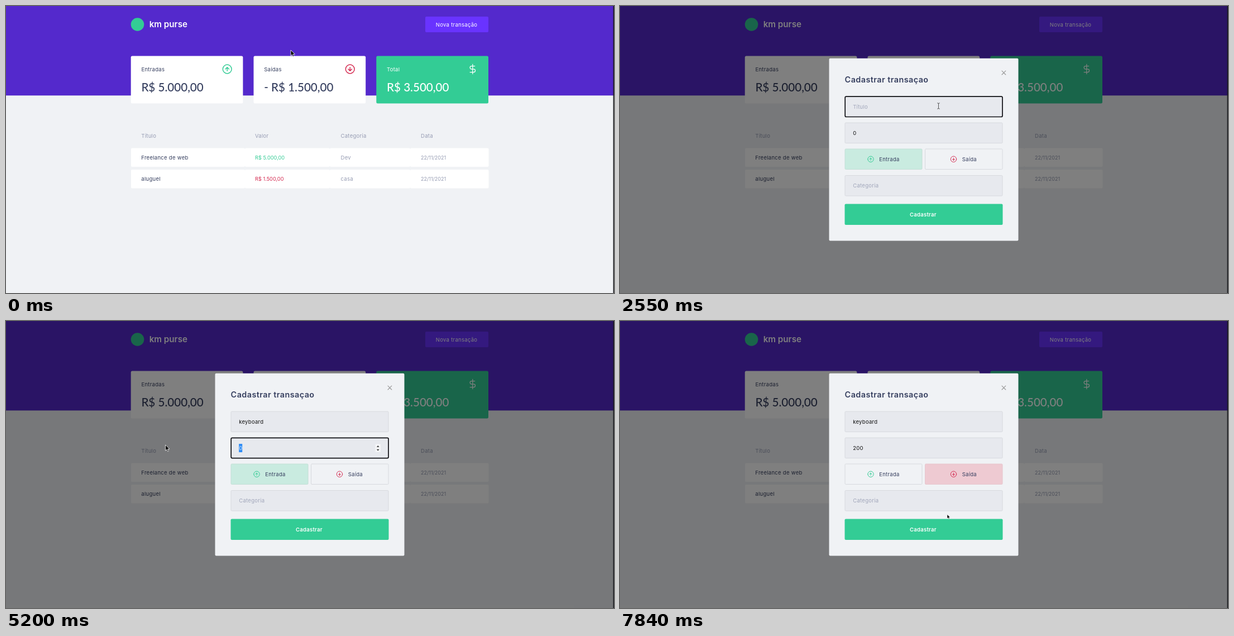
An HTML page for the animation above (8 s loop, 1089 by 514 pixels).

```html
<!DOCTYPE html>
<html lang="pt-BR">
<head>
<meta charset="utf-8">
<title>Transações</title>
<style>
html, body { margin: 0; width: 100%; height: 100%; overflow: hidden; background: #f0f2f5 }
svg { display: block; width: 1089px; height: 514px }
text { font: 9.5px Inter, "Open Sans", sans-serif; letter-spacing: .03em; white-space: pre }
.big { font: 500 20.6px Lato, sans-serif; letter-spacing: 0 }
.brand { font-size: 15.2px; font-weight: 600; letter-spacing: 0 }
.title { font-size: 14.4px; font-weight: 600; letter-spacing: .03em }
.bold { font-weight: 600 }
.money { font-size: 9.2px; letter-spacing: 0 }
.date { font-size: 9px; letter-spacing: 0 }
.line { fill: none; stroke-linecap: round; stroke-linejoin: round }
</style>
</head>
<body>
<svg id="stage" viewBox="0 0 1089 514"></svg>
<script>
const stage = document.getElementById('stage');
const GREEN = '#33cc95', RED = '#d4284f', INK = '#363f5f', GRAY = '#969cb3';

const rect = (x, y, w, h, fill, r = 2, extra = '') =>
  `<rect x="${x}" y="${y}" width="${w}" height="${h}" rx="${r}" fill="${fill}" ${extra}/>`;
const text = (x, y, s, fill, cls = '') =>
  `<text x="${x}" y="${y}" fill="${fill}" class="${cls}">${s}</text>`;
const line = (d, color, width, move = '') =>
  `<path class="line" d="${d}" stroke="${color}" stroke-width="${width}" transform="${move}"/>`;
const arrowIcon = (x, y, r, color, down) =>
  line('M-10 0a10 10 0 1 0 20 0a10 10 0 1 0-20 0M0 4V-4M-4 0L0-4L4 0', color, 1.9,
    `translate(${x} ${y}) scale(${r / 10}) rotate(${down ? 180 : 0})`);
const box = (x, y, w, fill, border = '#d7d9de') =>
  rect(x + .5, y + .5, w - 1, 36.5, fill, 1.5, `stroke="${border}"`);

function card(x, label, sum, fill, ink, icon) {
  return rect(x, 89.6, 200.7, 84.8, fill, 2.5) + text(x + 18.7, 116.7, label, ink) +
    text(x + 18.7, 153.2, sum, ink, 'big') + icon;
}

const columns = [224, 428, 580, 724, 864.5];
const labelX = [242.3, 446, 599.5, 743];
function row(y, cells, valueColor) {
  const colors = [INK, valueColor, GRAY, GRAY];
  const classes = ['', 'money', '', 'date'];
  return cells.map((s, i) =>
    rect(columns[i], y, columns[i + 1] - columns[i], 33.5, '#fff') +
    text(labelX[i], y + 20, s, colors[i], classes[i])).join('');
}

function page(hover) {
  return rect(0, 0, 1089, 514, '#f0f2f5', 0) + rect(0, 0, 1089, 160.3, '#5429cc', 0) +
    `<circle cx="235.5" cy="33" r="11.8" fill="${GREEN}"/>` +
    text(256.7, 38.2, 'km purse', '#fff', 'brand') +
    rect(751, 19, 113, 28, hover ? '#5f2ee6' : '#6933ff') +
    text(769.8, 36.5, 'Nova transação', hover ? '#e6e6e6' : '#fff') +
    card(223.7, 'Entradas', 'R$ 5.000,00', '#fff', INK, arrowIcon(396.2, 113, 7.9, GREEN)) +
    card(443.5, 'Saídas', '- R$ 1.500,00', '#fff', INK, arrowIcon(616.2, 113, 7.9, RED, true)) +
    card(663.3, 'Total', 'R$ 3.500,00', GREEN, '#fff',
      line('M12 1V23M17 5H9.5a3.5 3.5 0 0 0 0 7h5a3.5 3.5 0 0 1 0 7H6', '#fff', 1.6,
        'translate(826.4 103.7) scale(.783)')) +
    ['Título', 'Valor', 'Categoria', 'Data'].map((s, i) => text(labelX[i], 236.3, s, GRAY)).join('') +
    row(254.5, ['Freelance de web', 'R$ 5.000,00', 'Dev', '22/11/2021'], GREEN) +
    row(293, ['aluguel', 'R$ 1.500,00', 'casa', '22/11/2021'], RED);
}

function field(y, value, hint, focus) {
  return box(402.5, y, 283, '#e7e9ee') +
    (focus ? rect(403.2, y + .7, 281.8, 36.3, 'none', 2, 'stroke="#101014" stroke-width="1.7"') : '') +
    (value ? text(417.2, y + 22.3, value, '#111', 'value') : text(417.2, y + 22.3, hint, '#a0a6ba'));
}

function choice(x, w, iconX, label, fill, border, color, down) {
  return box(x, 255.5, w, fill, border) + arrowIcon(iconX, 274.3, 5.2, color, down) +
    text(iconX + 15.2, 277.9, label, INK);
}

const countPast = (times, t) => times.filter(k => t >= k).length;

function modal(t) {
  const first = t >= 2150 && t < 4520, second = t >= 4520 && t < 7460;
  const typed = countPast([2850, 2950, 3150, 3540, 3740, 3830, 3930, 4120], t);
  const digits = countPast([6200, 6290, 6490], t);
  const out = t >= 7560, over = t >= 7370 && !out;
  let s = rect(0, 0, 1089, 514, 'rgba(0,0,0,.5)', 0) +
    rect(374.5, 93.7, 339, 326.8, '#f0f2f5', 2) +
    line('M684 116.2l6.8 6.8m0-6.8l-6.8 6.8', '#969696', 1.1) +
    text(402.6, 137.2, 'Cadastrar transaçao', INK, 'title') +
    field(161.5, 'keyboard'.slice(0, typed), 'Título', first) +
    field(208.6, '200'.slice(0, digits) || '0', '', second) +
    choice(402.5, 139, 449, 'Entrada', out ? '#f0f2f5' : '#c9ebe0', out ? '#d7d9de' : '#c3dfd6', GREEN) +
    choice(546, 139.5, 597.5, 'Saída', out ? '#eecad2' : '#f0f2f5',
      out ? '#e6c6ce' : over ? '#a9abb0' : '#d7d9de', RED, true) +
    field(303, '', 'Categoria') +
    rect(402.5, 354.5, 283, 37.5, GREEN) +
    text(519, 376.9, 'Cadastrar', '#fff', 'bold');
  if (second) {
    s += rect(661.5, 220.5, 9.5, 14, '#f5f6f8', 1) +
      '<path d="M663.8 225.7l2.4-2.8 2.4 2.8zm0 4l2.4 2.8 2.4-2.8z" fill="#333"/>';
    if (!digits) s += rect(417.2, 220, 6, 15, '#2f8cf5', 0) + text(417.2, 230.9, '0', '#d5e7fb');
  }
  return s;
}

// time, x, y, shape; each pose holds until the next
const poses = [
  [0, 510, 79, 'arrow'], [110, 0, 0, ''],
  [610, 456, 2, 'arrow'], [700, 560, 15, 'arrow'], [800, 680, 36, 'arrow'], [900, 772, 52, 'arrow'],
  [1000, 836, 60, 'arrow'], [1090, 814, 45, 'hand'], [1190, 787.5, 41.5, 'hand'],
  [1380, 787, 43.5, 'arrow'], [1570, 770, 60, 'arrow'], [1670, 715, 100, 'arrow'],
  [1760, 650, 140, 'arrow'], [1860, 596, 168, 'beam'], [1960, 570.5, 179, 'beam'],
  [4120, 0, 0, ''],
  [4520, 550, 168, 'beam'], [4620, 480, 146, 'arrow'], [4710, 405, 150, 'arrow'],
  [4810, 345, 180, 'arrow'], [4900, 306, 208, 'arrow'], [5000, 289, 220, 'arrow'],
  [5200, 285.5, 222, 'arrow'],
  [6990, 318, 225, 'arrow'], [7090, 405, 236, 'arrow'], [7180, 505, 252, 'arrow'],
  [7280, 592, 266, 'hand'], [7370, 624, 273, 'hand'], [7460, 622.5, 270, 'hand'],
  [7650, 610, 300, 'arrow'], [7740, 592, 338, 'arrow'], [7840, 586, 346.5, 'small']
];
const arrow = '<path d="M0 0V10.2L2.4 8 4 11.6 5.8 10.8 4.2 7.3H7.5Z" fill="#000" stroke="#fff" stroke-width=".8"/>';
const shapes = {
  '': '', arrow,
  small: `<g transform="scale(.72)">${arrow}</g>`,
  hand: '<path d="M-1 1Q0-.4 1 1V4.5L5 5.4Q6 6 5.7 8L4.6 12H-.5L-3.7 7.7Q-3.8 6.3-2.4 6.6L-1 8Z" fill="#fff" stroke="#222" stroke-width=".8"/>',
  beam: line('M-1.8-5.2Q0-5.2 0-4Q0-5.2 1.8-5.2M0-4V4M-1.8 5.2Q0 5.2 0 4Q0 5.2 1.8 5.2', '#444', .9)
};

function caret(t) {
  const on = t >= 2150 && t < 2550 || t >= 2850 && t < 4520 || t >= 6200 && t < 7460;
  if (!on) return;
  const second = t >= 4520;
  const value = stage.querySelectorAll('.value')[second ? 1 : 0];
  const x = 417.5 + (t < 2850 ? 0 : value.getComputedTextLength());
  stage.insertAdjacentHTML('beforeend', rect(x, second ? 221 : 174, .9, 13, '#111', 0));
}

let last;
function frame(now) {
  const t = now % 8000;
  const tick = Math.floor(t / 10);
  if (tick !== last) {
    last = tick;
    const [, x, y, shape] = poses.findLast(p => t >= p[0]);
    stage.innerHTML = page(t >= 1090 && t < 1570) + (t >= 1380 ? modal(t) : '') +
      rect(1087.6, 0, 1.4, 514, '#15151a', 0);
    caret(t);
    stage.insertAdjacentHTML('beforeend', `<g transform="translate(${x} ${y})">${shapes[shape]}</g>`);
  }
  requestAnimationFrame(frame);
}
frame(performance.now());
</script>
</body>
</html>
```
